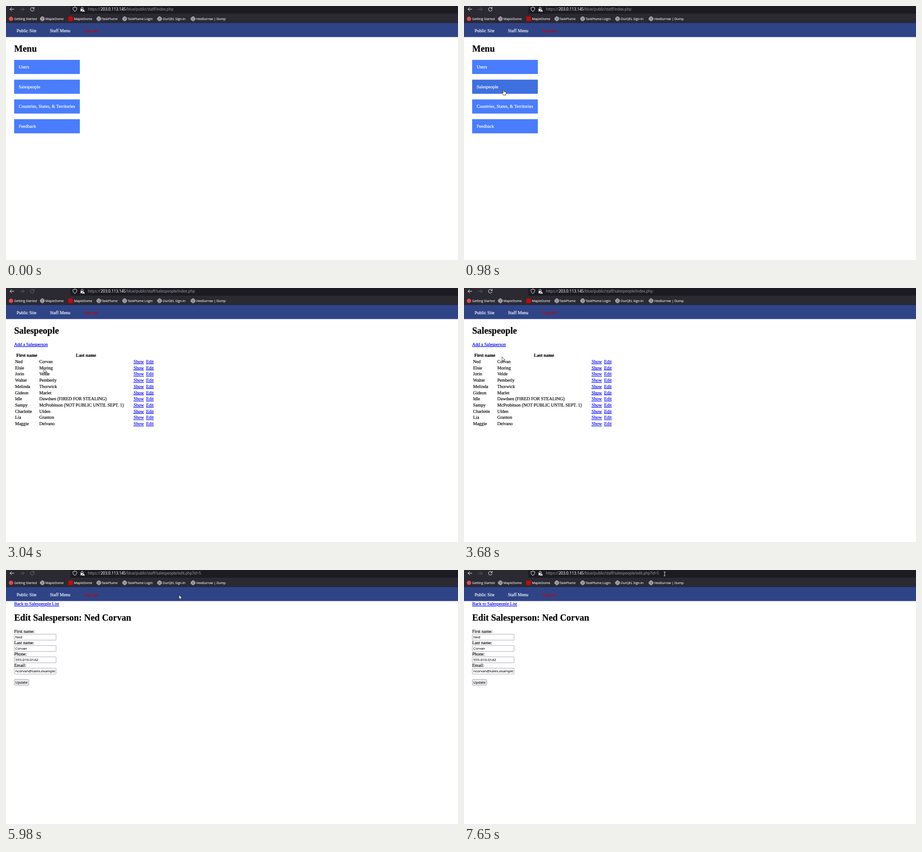
An HTML page for the animation above (8000 ms loop, 998 px wide and 561 px high).

```html
<!DOCTYPE html>
<html lang="en">
<head>
<meta charset="utf-8">
<title>Staff area</title>
<style>
html, body { margin: 0; width: 100%; height: 100%; overflow: hidden; background: #fff; }
svg { display: block; width: 100vw; height: 100vh; font: 10px "Liberation Serif", serif; color: #000; }
text { fill: currentColor; stroke: currentColor; stroke-width: .2; }
.ui { font-family: "Open Sans", "Noto Sans", sans-serif; stroke-width: .1; }
.h1 { font-size: 20px; font-weight: bold; }
.th { font-weight: bold; text-anchor: middle; }
.link { color: #00e; text-decoration: underline; }
.white { color: #fff; }
.red { color: #d00000; }
.mark { font-size: 7.1px; color: #fbfbfe; }
.url { font-size: 8.05px; color: #96959d; }
.host { font-size: 8.5px; color: #fbfbfe; }
.field { font-size: 7.9px; }
.line { fill: none; stroke: #fbfbfe; stroke-width: 1; stroke-linecap: round; stroke-linejoin: round; }
.box { stroke: #8f8f9d; stroke-width: .8; }
.cursor path { stroke-linejoin: round; }
</style>
</head>
<body>
<svg viewBox="0 0 998 561" id="stage"></svg>
<script>
const stage = document.getElementById('stage');
const text = (x, y, s, cls = '', more = '') => `<text x="${x}" y="${y}" class="${cls}" ${more}>${s}</text>`;
const rect = (x, y, w, h, fill, more = '') =>
  `<rect x="${x}" y="${y}" width="${w}" height="${h}" fill="${fill}" ${more}/>`;
const line = (d, more = '') => `<path class="line" d="${d}" ${more}/>`;

// Browser chrome
const bookmarks = [
  [18, 'Getting Started'], [87, 'MapleDome'], [150, 'MapleDome'], [211, 'TaskPlume'],
  [268.5, 'TaskPlume Login'], [346, 'OurQEL Sign-in'], [420, 'HexBurrow | Dump']
];
const hoverable = [[331, 404], [405, 486]];

function globe(x) {
  return `<g transform="translate(${x} 28.3)">` +
    line('M-4.5 0A4.5 4.5 0 1 1 4.5 0A4.5 4.5 0 1 1 -4.5 0M-4.3 -1.3H4.3M-4.3 1.3H4.3' +
      'M0 -4.5C-2.6 -2 -2.6 2 0 4.5C2.6 2 2.6 -2 0 -4.5', 'style="stroke-width:.85"') + '</g>';
}

const chrome =
  rect(0, 0, 998, 38, '#2b2a33') + rect(142, 0, 856, 17, '#1c1b22') + rect(0, 36.8, 998, 1, '#151419') +
  hoverable.map(([a, b]) => rect(a, 19.5, b - a, 17, '#4a4951', 'rx="2" class="markHover"')).join('') +
  line('M17.5 7.2H9M12.5 3.5L8.8 7.2L12.5 10.9') +
  line('M31.5 7.2H40M36.5 3.5L40.2 7.2L36.5 10.9', 'style="stroke:#65646c"') +
  line('M61.3 4.6A4.1 4.1 0 1 0 62.1 8M62.2 2.8V5.6H59.3', 'id="reload"') +
  line('M152 2.3C153.5 3.3 155 3.6 156.2 3.7C156.4 8 155 10.5 152 12C149 10.5 147.6 8 147.8 3.7C149 3.6 150.5 3.3 152 2.3Z') +
  line('M166 6.5V5A2.2 2.2 0 0 1 170.4 5V6.5') +
  '<path d="M164.7 6.5H170L167.4 11.8H164.7Z" fill="#fbfbfe"/>' +
  '<path d="M171 6.4L174 12.2H168Z" fill="#fbfbfe"/>' + rect(170.7, 8.3, .6, 2, '#1c1b22') +
  text(181, 10.4, 'https://', 'ui url') + text(209, 10.4, '203.0.113.145', 'ui host') +
  text(264.7, 10.4, '', 'ui url', 'id="path"') +
  '<circle cx="11" cy="28.3" r="4.8" fill="#dd4a52"/>' + rect(137.5, 23.3, 10, 10, '#c90808') +
  [80.3, 205, 262, 339, 413].map(globe).join('') +
  bookmarks.map(([x, s]) => text(x, 31, s, 'ui mark')).join('') +
  rect(0, 37.4, 998, 31.2, '#2f4487') +
  text(23.5, 57.5, 'Public Site', 'white') + text(97, 57.5, 'Staff Menu', 'white') +
  text(172, 57.5, 'Log out', 'red');

// Pages
const buttonY = [0, 1, 2, 3].map(i => 119 + 43.67 * i);
const menu = text(18, 100.5, 'Menu', 'h1') +
  ['Users', 'Salespeople', 'Countries, States, &amp; Territories', 'Feedback'].map((s, i) =>
    rect(18, buttonY[i], 145, 31.2, '#497dfe', 'class="button"') +
    text(28, buttonY[i] + 19, s, 'white')).join('');

const people = [
  'Ned Corvan', 'Elsie Moring', 'Jorin Velde', 'Walter Pemberly', 'Melinda Thorwick', 'Gideon Marlet',
  'Idle Dawdsen (FIRED FOR STEALING)', 'Sampy McProbitson (NOT PUBLIC UNTIL SEPT. 1)',
  'Charlotte Ulden', 'Lia Granton', 'Maggie Delvano'
];
const list = text(18, 100.5, 'Salespeople', 'h1') + text(18, 128, 'Add a Salesperson', 'link') +
  text(46, 152.3, 'First name', 'th') + text(176.7, 152.3, 'Last name', 'th') +
  people.map((name, i) => {
    const y = 166 + 13.72 * i, gap = name.indexOf(' ');
    return text(20, y, name.slice(0, gap)) + text(73.5, y, name.slice(gap + 1)) +
      text(281.7, y, 'Show', 'link') + text(309.3, y, 'Edit', 'link');
  }).join('');

const fields = [['First name:', 'Ned'], ['Last name:', 'Corvan'], ['Phone:', '555-010-0142'],
  ['Email:', 'ncorvan@sales.example']];
const edit = '<clipPath id="inner"><rect x="20" y="140" width="88.5" height="100"/></clipPath>' +
  text(18, 78.3, 'Back to Salespeople List', 'link') +
  text(18, 111.7, 'Edit Salesperson: Ned Corvan', 'h1') +
  fields.map(([label, value], i) => {
    const y = 139 + 25 * i;
    return text(18, y, label) + rect(18.4, y + 2.9, 92.2, 13, '#fff', 'rx="1.2" class="box"') +
      text(20.5, y + 12.4, value, 'ui field', 'clip-path="url(#inner)"');
  }).join('') +
  rect(18.4, 241.6, 32, 13, '#e9e9ed', 'rx="2" class="box"') +
  text(34.3, 251, 'Update', 'ui field', 'text-anchor="middle"');

// Pointer shapes, hot spot at 0,0
const shapes = {
  arrow: '<path d="M0 0V9.6L2.2 7.6L3.7 11L5.2 10.3L3.8 7.1H6.7Z" fill="#fff" stroke="#000" stroke-width=".7"/>',
  hand: '<path d="M-1 1Q0 -.6 1 1V4.6L5.2 5.6Q6.2 6 6 7.4L5 12.8H-.4L-3.8 8.4Q-3.6 6.8 -2.2 7.4L-1 8.4Z" fill="#fff" stroke="#000" stroke-width=".8"/>',
  beam: '<path d="M-2 -4.5H-.5L0 -4L.5 -4.5H2M0 -4V4M-2 4.5H-.5L0 4L.5 4.5H2" fill="none" stroke="#fff" stroke-width=".9"/>'
};

stage.innerHTML = rect(0, 0, 998, 561, '#fff') + chrome +
  [menu, list, edit].map(p => `<g class="page">${p}</g>`).join('') +
  '<g id="pointer">' + Object.entries(shapes).map(([k, s]) => `<g class="cursor" id="${k}">${s}</g>`).join('') + '</g>';

const get = id => document.getElementById(id);
const all = cls => [...stage.querySelectorAll('.' + cls)];
const show = (el, on) => { el.style.display = on ? '' : 'none'; };
const pages = all('page'), buttons = all('button'), marks = all('markHover'), cursors = all('cursor');
const [pointer, reload, path] = ['pointer', 'reload', 'path'].map(get);
const paths = ['index.php', 'salespeople/index.php', 'salespeople/edit.php?id=5'];

// Pointer track: time, x, y
const track = [
  [70, 888, 550], [250, 560, 440], [400, 270, 330], [500, 165, 275], [610, 137.5, 232], [720, 112, 208],
  [830, 92, 192], [1100, 83.5, 178], [3260, 83.5, 178], [3420, 112, 196], [3680, 84, 152], [4000, 59, 126],
  [4220, 59, 126], [4450, 190, 142], [4710, 321, 165], [5450, 321, 165], [5930, 379, 60], [5980, 382, 55],
  [6300, 389, 41], [6670, 400, 32], [6740, 403, 31], [7150, 455, 28], [7530, 437, 18], [7580, 438, 18],
  [7650, 443, 8.5]
];

function place(t) {
  const i = track.findIndex(k => k[0] > t);
  if (i < 0) return track[track.length - 1].slice(1);
  if (i === 0) return track[0].slice(1);
  const [a, b] = [track[i - 1], track[i]], u = (t - a[0]) / (b[0] - a[0]);
  return [a[1] + (b[1] - a[1]) * u, a[2] + (b[2] - a[2]) * u];
}

const between = (v, a, b) => v >= a && v < b;
const buttonAt = ([x, y]) => between(x, 18, 163) ? buttonY.findIndex(b => between(y, b, b + 31)) : -1;

function cursorAt(page, [x, y]) {
  if (y < 17) return 'beam';
  const onLink = page === 0 ? buttonAt([x, y]) >= 0
    : page === 1 && (between(x, 18, 92) && between(y, 119, 131) ||
      (between(x, 281, 305) || between(x, 309, 327)) && between(y, 157, 306));
  return onLink ? 'hand' : 'arrow';
}

function draw(t) {
  const page = t < 2570 ? 0 : t < 5120 ? 1 : 2;
  // Button highlight trails the pointer slightly
  const pos = place(t), hovered = t < 130 ? -1 : buttonAt(place(t - 60));
  const kind = cursorAt(page, pos);
  pages.forEach((p, i) => show(p, i === page));
  buttons.forEach((b, i) => b.setAttribute('fill', i === hovered ? '#3f70e0' : '#497dfe'));
  marks.forEach((m, i) => show(m, between(pos[0], ...hoverable[i]) && between(pos[1], 19, 37)));
  cursors.forEach(c => show(c, c.id === kind));
  show(pointer, t >= 70);
  pointer.setAttribute('transform', `translate(${pos})`);
  path.textContent = '/blue/public/staff/' + paths[page];
  const loading = between(t, 2570, 3400) || between(t, 5120, 6400);
  reload.style.stroke = loading ? '#75747c' : '#fbfbfe';
}

const start = performance.now();
function tick() {
  draw((performance.now() - start) % 8000);
  requestAnimationFrame(tick);
}
tick();
</script>
</body>
</html>
```
